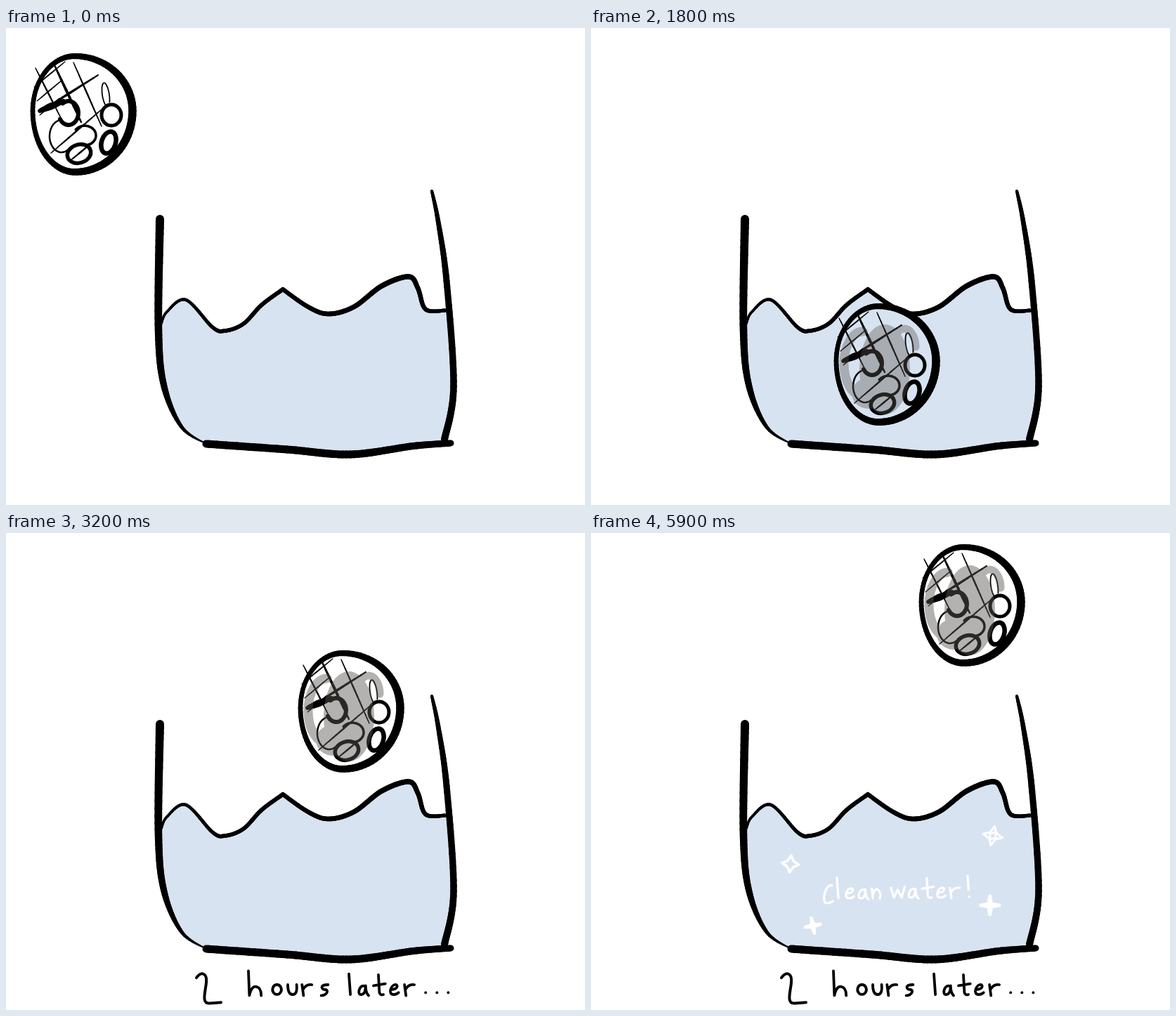
These frames come from a looping animation (824x679 px, 6000 ms). An HTML page with a canvas:

```html
<!DOCTYPE html>
<html lang="en">
<head>
<meta charset="utf-8">
<title>Water filter</title>
<style>
  html, body { margin: 0; width: 100%; height: 100%; overflow: hidden; background: #fff; }
  canvas { display: block; }
</style>
</head>
<body>
<canvas id="stage" width="824" height="679" role="img" aria-label="2 hours later... clean water!"></canvas>
<script>
const W = 824, H = 679, STEP = 100, STEPS = 60;
const { PI, sin, cos, min, max, round, floor } = Math;
const stage = document.getElementById('stage').getContext('2d');
let ctx;

function layer(color, draw) {
  const c = document.createElement('canvas');
  c.width = W;
  c.height = H;
  ctx = c.getContext('2d');
  ctx.lineCap = ctx.lineJoin = 'round';
  ctx.strokeStyle = ctx.fillStyle = color;
  draw();
  return c;
}

// Catmull-Rom curve through key points
function smooth(pts, n = 16) {
  const out = [];
  for (let i = 0; i < pts.length - 1; i++) {
    const a = pts[i - 1] || pts[i], b = pts[i], c = pts[i + 1], d = pts[i + 2] || c;
    for (let k = 0; k < n; k++) {
      const t = k / n;
      out.push(b.map((v, j) => v + 0.5 * t * (c[j] - a[j] +
        t * (2 * a[j] - 5 * v + 4 * c[j] - d[j] + t * (3 * (v - c[j]) + d[j] - a[j])))));
    }
  }
  out.push(pts[pts.length - 1]);
  return out;
}

// Ink line whose width goes from start through mid to end
function ink(curve, start, mid, end) {
  for (let i = 1; i < curve.length; i++) {
    const t = i / (curve.length - 1);
    ctx.lineWidth = t < 0.5 ? start + (mid - start) * 2 * t : mid + (end - mid) * (2 * t - 1);
    ctx.beginPath();
    ctx.moveTo(...curve[i - 1]);
    ctx.lineTo(...curve[i]);
    ctx.stroke();
  }
}

function line(w, x1, y1, x2, y2) {
  ink(smooth([[x1, y1], [x2, y2]]), w * 0.5, w, w * 0.6);
}

function ring(w, x, y, rx, ry, tilt = 0, from = 0, to = 2 * PI) {
  ctx.lineWidth = w;
  ctx.beginPath();
  ctx.ellipse(x, y, rx, ry, tilt, from, to);
  ctx.stroke();
}

function disc(x, y, rx, ry) {
  ctx.beginPath();
  ctx.ellipse(x, y, rx, ry, 0, 0, 2 * PI);
  ctx.fill();
}

function star(w, x, y, r, waist, tilt) {
  ctx.lineWidth = w;
  ctx.beginPath();
  for (let i = 0; i < 8; i++) {
    const a = tilt + i * PI / 4, d = i % 2 ? r * waist : r;
    ctx.lineTo(x + d * cos(a), y + d * sin(a));
  }
  ctx.closePath();
  ctx.stroke();
}

// Handwritten letters in x-height units: advance and strokes above the baseline
const letters = {
  2: [3, 'M0-1.7C.5-2.4 1.1-2.2 1-1.2S.5 .9 1.3 .9L2.5 .8'],
  h: [2.2, 'M0-2.4L.1 .1Q.3-.9 .8-.8T1.3 .1'],
  o: [1.5, 'M.5-1A.45 .5 0 1 0 .6-1'],
  u: [1.3, 'M0-1Q0 0 .5 0T.9-1'],
  r: [1.8, 'M0-1L.15 .1M.1-.5Q.4-1.1 1-1'],
  s: [1, 'M.7-1C-.2-1 0-.5 .4-.5S.6 .1 0 .1'],
  l: [.85, 'M0-2.1L.15 0'],
  a: [1.35, 'M.7-.8C.1-1.2-.2 0 .2 0S.7-.5 .7-.9Q.7-.2 1 .1'],
  t: [1.5, 'M.5-2L.6-.2Q.7 .1 1 0M0-.9L1.2-1.1'],
  e: [1.35, 'M.1-.5C.9-.5 .9-1.1 .5-1S-.2 0 .4 0Q.7 0 .9-.2'],
  c: [1.3, 'M.8-1.3C.2-1.6-.4 .5 .3 .5Q.6 .5 .9 .3'],
  n: [1.2, 'M0-1L.1 0V-.4Q.4-1.2 .7-.8T.8 0'],
  w: [1.8, 'M0-1L.3 0L.7-.8L1.1 0L1.4-1.1'],
  '!': [.5, 'M0-2.2L.1-.8M.15-.1V-.09'],
  '.': [1, 'M.2-.2V-.19']
};

function write(word, x, y, w, tracking = 0) {
  const size = 14;
  ctx.lineWidth = w / size;
  for (const ch of word) {
    const [advance, strokes] = letters[ch];
    ctx.save();
    ctx.translate(x, y);
    ctx.scale(size, size);
    ctx.stroke(new Path2D(strokes));
    ctx.restore();
    x += (advance + tracking) * size;
  }
}

const tank = layer('#000', () => {
  const leftWave = smooth([[221, 421], [229, 404], [256, 387], [294, 426], [312, 431],
    [338, 421], [364, 394], [394, 372]]);
  const rightWave = smooth([[394, 372], [430, 397], [459, 407], [495, 397], [535, 367],
    [573, 354], [586, 370], [594, 396], [604, 403], [625, 402]]);
  const leftWall = smooth([[219, 272], [217, 430], [225, 510], [250, 568], [285, 592]]);
  const floorLine = smooth([[285, 592], [400, 600], [490, 607], [580, 595], [633, 591]]);
  const rightWall = smooth([[606, 232], [615, 275], [627, 360], [637, 510], [624, 586]]);

  ctx.fillStyle = '#d8e3f1';
  ctx.beginPath();
  const below = p => p[1] > 415;
  [...leftWave, ...rightWave, ...rightWall.filter(below), ...floorLine.reverse(),
    ...leftWall.filter(below).reverse()].forEach(p => ctx.lineTo(...p));
  ctx.fill();

  ink(leftWave, 3, 5.5, 6);
  ink(rightWave, 6, 7.5, 5);
  ink(leftWall.reverse(), 1, 9, 12);
  ink(floorLine.reverse(), 11, 11, 9);
  ink(rightWall, 4, 9, 10);
});

const ball = layer('#000', () => {
  // lopsided egg, heavier on its right side
  const egg = Array.from({ length: 91 }, (_, i) => {
    const a = i * PI / 45, c = cos(a), s = sin(a);
    return [98 + c * (c > 0 ? 82 : 60), 118 + s * (s > 0 ? 87 : 78)];
  });
  for (let i = 0; i < 90; i++) {
    const w = 9 + 2.5 * cos(i * PI / 45 - 0.3);
    ink(egg.slice(i, i + 2), w, w, w);
  }

  for (let i = 0; i < 3; i++) {
    line(2.5 + 1.5 * sin(i * PI / 2), 42 + 27 * i, 57 - 4 * i, 78 + 29 * i, 128 + 6 * i);
    line(2, 40 + 4 * i, 84 + 20 * i, 84 - 4 * i, 48 + 26 * i);
  }
  line(3.5, 52, 117, 131, 67);
  line(2.5, 64, 178, 136, 116);
  line(2.5, 90, 190, 124, 162);

  line(10, 48, 118, 82, 104);
  ring(6, 89, 121, 14, 17, 0, -2.2, 2.6);
  ring(5, 150, 124, 14, 15);
  ring(6.5, 146, 163, 10, 16, 0.3);
  ring(3.5, 112, 153, 16, 14, 0, -2.5, 2);
  ring(5.5, 104, 179, 17, 13, -0.3);
  ring(2.5, 79, 154, 17, 23, 0, 1, 4.4);
  ring(1.8, 142, 95, 5, 17, -0.15, 2.2, 7);
});

const dirt = layer('#5c5853', () => {
  disc(107, 130, 36, 64);
  disc(84, 164, 24, 22);
  ring(13, 76, 122, 27, 46, 0, PI / 2, 3 * PI / 2);
  ring(11, 135, 98, 16, 26, 0, PI, 2 * PI);
});

const caption = layer('#000', () => {
  write('2', 271, 657, 4);
  write('hours', 345, 657, 3.8, 0.15);
  write('later...', 488, 657, 3.8, 0.15);
});

const sparkle = layer('#fff', () => {
  write('clean', 332, 520, 3.2);
  write('water!', 427, 519, 3.2);
  star(3.5, 284, 471, 12, 0.5, 0.1);
  star(3, 572, 431, 14, 0.45, 0.2);
  star(2.5, 572, 431, 7, 0.5, 0.6);
  star(4.5, 316, 559, 11, 0.2, -0.2);
  star(5, 568, 530, 13, 0.2, 0);
});

// one rise and return every seven steps
const swing = k => sin(PI * (k % 7) / 6);

function ballAt(s) {
  if (s < 6) {
    const u = s / 6;
    return [308 * (1 - (1 - u) ** 1.25), 358 * u ** 2.9];
  }
  if (s < 13) {
    const k = s - 6;
    return [309 + k / 6 + 8 * swing(k), 329.5 + 44.5 * cos(0.87 + 0.988 * k)];
  }
  if (s < 27) return [309.5 + 2 * swing(s - 13), 349 + 14 * swing(s - 13)];
  const u = min((s - 27) / 6, 1);
  return [310 + 122 * u ** 3, 368 - 388 * u ** 2.7];
}

function frame(now) {
  const s = floor(now / STEP) % STEPS;
  const [x, y] = ballAt(s).map(round);
  stage.fillStyle = '#fff';
  stage.fillRect(0, 0, W, H);
  stage.drawImage(tank, 0, 0);
  if (s >= 28) stage.drawImage(caption, 0, 0);
  if (s >= 34) stage.drawImage(sparkle, -12 + 13.5 * swing(s - 34), 0);
  stage.drawImage(ball, x, y);
  stage.globalAlpha = 0.455 * min(max((s - 13) / 6, 0), 1);
  stage.drawImage(dirt, x, y);
  stage.globalAlpha = 1;
}

const start = performance.now();
function tick() {
  frame(performance.now() - start);
  requestAnimationFrame(tick);
}
tick();
</script>
</body>
</html>
```
